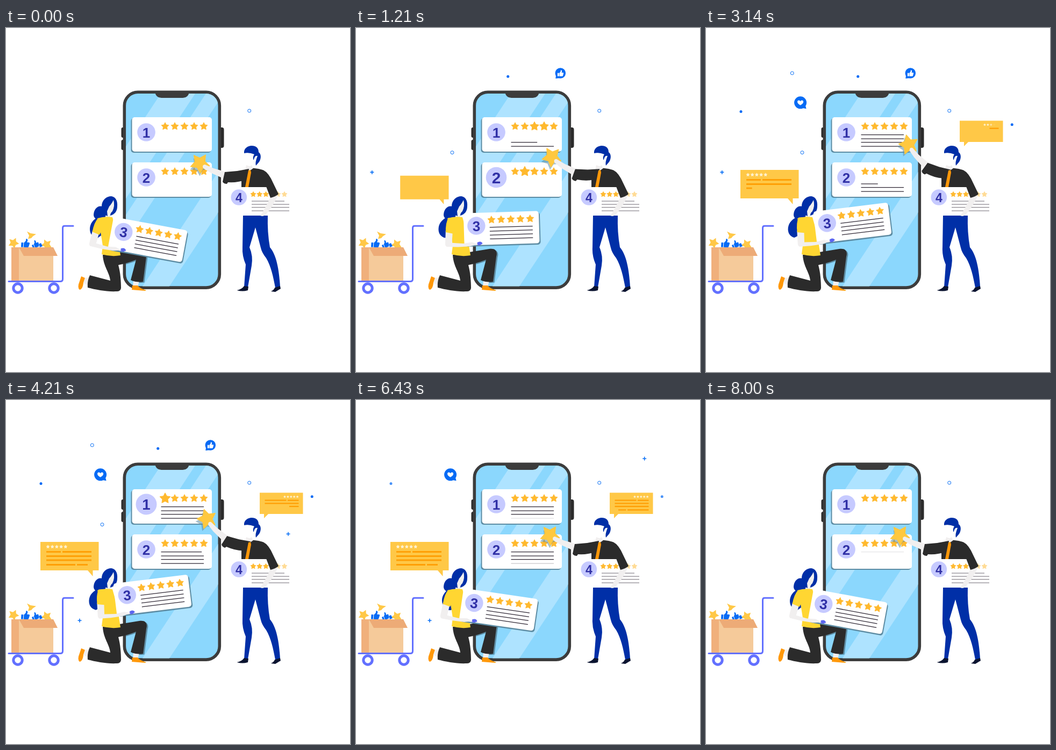
Write an HTML page that moves like this. It is 640 by 640 pixels and loops after 8430 ms.

```html
<!DOCTYPE html>
<html lang="en">
<head>
<meta charset="utf-8">
<title>Customer reviews</title>
<style>
html, body { margin: 0; width: 100%; height: 100%; overflow: hidden; background: #fff; }
svg { display: block; width: 100vw; height: 100vh; }
text { font: bold 26px "Liberation Sans", Arial, sans-serif; fill: #3030a6; text-anchor: middle; }
.dark { fill: #2b2b2b; }
.navy { fill: #002fa7; }
.skin { fill: #f1efef; }
.gold { fill: #ffc847; }
.prize { fill: #ffc83f; stroke: #ffc83f; stroke-width: 1.5; stroke-linejoin: round; }
.star { fill: #ffb92e; stroke: #ffb92e; stroke-width: .8; stroke-linejoin: round; }
.orange { fill: #ff9809; }
.yellow { fill: #ffd632; }
.lilac { fill: #c6caff; }
.blue { fill: #066bf5; }
.shade { fill: #5d8ca3; }
.cream { fill: #fff2cf; }
.white { fill: #fff; }
.rule { stroke: #2d2633; stroke-width: 1.25; }
.bar { stroke: #ff9f05; stroke-width: 2.8; }
.ink { stroke: #0a70f5; fill: none; }
</style>
</head>
<body>
<svg viewBox="0 0 640 640">
  <defs>
    <clipPath id="screen"><rect x="223" y="122" width="171.500" height="358.500" rx="22"/></clipPath>
    <g id="thumb">
      <path d="M-7.500 -.5h3.800v8.500h-3.800z"/>
      <path d="M-2.700 0L.5 -4L1 -8Q4 -8 4 -5L3 -1.500H7Q8.500 -1 8 1L6.500 6.500Q6 8 4.500 8H-2.700z"/>
    </g>
    <path id="legs" d="M180 422L248 411C259 409 264 416 261 425L255 472Q243 474 232 469L242 431Q228 437 209 441C213 455 214 472 214 484Q213 490 206 490C188 491 168 487 152 483Q151 470 156 460L194 470C193 455 181 444 180 422Z"/>
  </defs>

  <g id="phone">
    <rect class="dark" x="214.500" y="185" width="8" height="19" rx="3"/>
    <rect class="dark" x="214.500" y="208" width="8" height="19" rx="3"/>
    <rect class="dark" x="395" y="185" width="10.500" height="38" rx="4"/>
    <rect x="220.300" y="119.300" width="177" height="363.800" rx="25" fill="#8bd7fd" stroke="#3c3c3c" stroke-width="5.600"/>
    <g clip-path="url(#screen)" fill="#aee3ff">
      <path d="M288 122H352L114 482H50Z"/>
      <path d="M372 122H405L167 482H134Z"/>
      <path d="M491 122H541L303 482H253Z"/>
      <use href="#legs" class="shade" x="2.500" y="1.500"/>
    </g>
    <path d="M277 119H341Q339 130 329 130H289Q279 130 277 119Z" fill="#3c3c3c"/>
  </g>
  <g id="reviews"></g>

  <g id="cart">
    <g id="goods"></g>
    <path d="M10 408H24V471H10Z" fill="#f0b07c"/>
    <path d="M24 408H88V471H24Z" fill="#f5ca9a"/>
    <path d="M24 408H88L96 424H33Z" fill="#edab77"/>
    <g fill="none" stroke="#6270ff" stroke-linecap="round">
      <path d="M5 471.500H101Q105.500 471.500 105.500 467V372Q105.500 368.300 109 368.300H125" stroke-width="3"/>
      <g stroke-width="5" fill="#fff"><circle cx="22" cy="484" r="8.200"/><circle cx="89" cy="484" r="8.200"/></g>
    </g>
  </g>

  <g id="woman">
    <path class="navy" id="tail" d="M174 350C162 356 156 364 156 374C156 384 162 390 170 391L180 384V352Z"/>
    <path class="navy" d="M180 332C170 329 163 338 163 348C164 356 172 358 178 356L192 348Z"/>
    <path class="skin" d="M191 330L203 318L206 331Q204 343 199 347L195 346L194 354H184Z"/>
    <path class="navy" d="M178 332C178 320 187 313 196 313C204 314 208 322 207 332C207 341 202 347 194 349Q194 344 198 341Q203 331 200 320Q196 328 192 332L188 341L189 350Q178 346 178 332Z"/>
    <path class="orange" d="M140 462L147 465L144 474Q143 486 137 487Q132 483 137 471Z"/>
    <path class="skin" d="M147 465L154 464L152 479L144 474Z"/>
    <path class="skin" d="M237 470H248L245 482H236Z"/>
    <path class="orange" d="M235 479L245 479Q248 484 261 488L259 489L234 487Z"/>
    <use href="#legs" class="dark"/>
    <path class="yellow" d="M170 354Q184 350 198 352L207 384L213 423Q196 426 178 421L180 405L176 380Z"/>
    <g id="hold">
      <rect class="shade" x="202" y="348" width="140" height="60" rx="5"/>
      <rect class="white" x="200" y="345.500" width="140" height="60" rx="5"/>
      <g id="third"></g>
      <path d="M224 401Q231 397 234 403L229 406H224Z" fill="#5b65f0"/>
      <path class="skin" d="M166 377L179 379L177 400L198 402L214 400L226 404L210 407.500L188 408L167 407Q164 405 164.500 401Z"/>
      <path class="yellow" d="M172 353Q166 362 166 380L180 383L189 354Z"/>
    </g>
  </g>

  <g id="man">
    <path class="navy" d="M441 349H487Q486 380 491 408C503 422 508 448 510 481L501 483C497 462 493 443 484 428Q476 418 474 409L464 371L453 408Q460 424 457 442L450 482H443L446 440Q439 424 440 408Z"/>
    <path d="M443 480L451 481L450 488Q440 491 429.500 488Q439 486 443 480ZM500 483L510 480L511 485L501 491L493 490Q499 487 500 483Z" fill="#0b1430"/>
    <path class="navy" d="M443 233C442 224 450 219 457 219C465 219 470 223 470 231C476 235 474 245 471 249L465 256Q463 250 468 238Q463 236 461 245H460Q459 239 462 235Q452 231 443 233Z"/>
    <path class="dark" d="M438 267L455 260L470 262Q482 264 489 280L488 297H438Z"/>
    <path class="skin" d="M447 255Q454 259 457 255L460 261L453 266L445 264Z"/>
    <rect class="white" x="414" y="296" width="91" height="53"/>
    <g id="fourth"></g>
    <path class="skin" d="M492 314L506 311Q497 332 484 346Q479 352 473 349Q484 333 492 314Z"/>
    <path class="dark" d="M474 263Q484 264 493 280L507 309Q501 314 492 316L484 295Z"/>
    <g id="reach">
      <g id="prize"></g>
      <path class="skin" d="M410 268L386 261L370 254Q364 255 367 261L380 269L409 282Z"/>
      <path class="dark" d="M452 262L430 266L407 268L403 286Q405 290 411 290L413 287Q431 288 444 283L450 278Z"/>
    </g>
    <path class="orange" d="M451 265L455 264L456 269L451 296H445Z"/>
  </g>

  <g id="bubbleL">
    <path class="gold" d="M64 264H172.500V317H161.500V328L152 317H64Z"/>
  </g>
  <g id="bubbleR">
    <path class="gold" d="M472 172.500H552.500V212H488L480 220V212H472Z"/>
  </g>
  <g id="floaters"></g>
</svg>
<script>
const LOOP = 8430;
const $ = id => document.getElementById(id);
const clamp = v => Math.max(0, Math.min(1, v));
const ramp = (t, start, span) => clamp((t - start) / span);
const bump = (t, peak, half) => Math.abs(t - peak) < half ? Math.cos(Math.PI * (t - peak) / half / 2) ** 2 : 0;
const updates = [];

function add(parent, tag, attrs, label) {
  const el = document.createElementNS("http://www.w3.org/2000/svg", tag);
  for (const k in attrs) el.setAttribute(k, attrs[k]);
  if (label) el.textContent = label;
  parent.appendChild(el);
  return el;
}

// Smooth track through [time, value] keys; flat at extremes and ends.
function track(keys) {
  const rise = i => (keys[i + 1][1] - keys[i][1]) / (keys[i + 1][0] - keys[i][0]);
  const slope = keys.map((_, i) => {
    if (!i || i === keys.length - 1) return 0;
    const a = rise(i - 1), b = rise(i);
    return a * b <= 0 ? 0 : 2 * a * b / (a + b);
  });
  return t => {
    let i = 0;
    while (i < keys.length - 2 && t > keys[i + 1][0]) i++;
    const [t0, a] = keys[i], [t1, b] = keys[i + 1];
    const h = t1 - t0, u = clamp((t - t0) / h), w = 1 - u;
    return a * w * w * (1 + 2 * u) + b * u * u * (3 - 2 * u) + h * u * w * (slope[i] * w - slope[i + 1] * u);
  };
}

function star(parent, x, y, r, cls = "star", turn = -90) {
  const pts = [];
  for (let i = 0; i < 10; i++) {
    const a = (turn + i * 36) * Math.PI / 180, q = i % 2 ? r * .52 : r;
    pts.push((q * Math.cos(a)).toFixed(2) + "," + (q * Math.sin(a)).toFixed(2));
  }
  return add(parent, "polygon", { points: pts.join(" "), class: cls, transform: `translate(${x} ${y})` });
}

const rule = (parent, a, b, y, cls = "rule") => add(parent, "line", { x1: a, x2: b, y1: y, y2: y, class: cls });

// A rule that grows from a to b.
function growing(parent, a, b, y, cls, start, span) {
  const el = rule(parent, a, a, y, cls);
  updates.push(t => {
    const p = ramp(t, start, span);
    el.setAttribute("x2", a + (b - a) * p);
    el.style.visibility = p ? "visible" : "hidden";
  });
  return el;
}

function pulse(el, x, y, size, peaks, half) {
  updates.push(t => {
    const s = 1 + size * Math.max(...peaks.map(p => bump(t, p, half)));
    el.setAttribute("transform", `translate(${x} ${y}) scale(${s})`);
  });
}

function badge(parent, x, y, r, label, size) {
  const disc = add(parent, "circle", { r, class: "lilac", transform: `translate(${x} ${y})` });
  const num = add(parent, "text", { y: size * .37, transform: `translate(${x} ${y})`, style: `font-size:${size}px` }, label);
  return [disc, num];
}

function review(top, label, o) {
  const g = add($("reviews"), "g", {});
  add(g, "rect", { x: 232.5, y: top + 2, width: 149, height: 64, rx: 5, class: "shade" });
  add(g, "rect", { x: 234.5, y: top, width: 148.5, height: 64, rx: 5, class: "white" });
  const [disc, num] = badge(g, 261, top + 28, 16.8, label, 26);
  pulse(disc, 261, top + 28, .16, o.disc, 350);
  pulse(num, 261, top + 28, .33, o.disc.map(p => p + 250), 350);
  for (let i = 0; i < 5; i++) {
    const x = 296 + 18 * i;
    pulse(star(g, x, top + 17, 7.3), x, top + 17, .38, o.stars.map(p => p + 333 * i), 333);
    if (i === 4) continue;
    const line = growing(g, 288.5, 368, top + [54, 46.500, 40, 32.500][i], "rule", o.start + o.step * i, o.span);
    updates.push(t => line.style.opacity = 1 - ramp(t, o.out + o.outStep * i, 500));
  }
}
review(166, "1", { disc: [650, 4210], stars: [377, 4210], start: 273, step: 553, span: 629, out: 6000, outStep: 480 });
review(250, "2", { disc: [1150, 4800], stars: [780, 4543], start: 1541, step: 654, span: 744, out: 6060, outStep: 500 });

badge($("third"), 223.3, 369.7, 16.7, "3", 26);
for (let i = 0; i < 5; i++) star($("third"), 251.7 + 18 * i, 359.5, 7.3);
for (let i = 0; i < 4; i++) rule($("third"), 248, 328, 373.3 + 7.2 * i);

badge($("fourth"), 433.3, 315, 14.8, "4", 23);
[460, 471.7, 483.5, 506, 518].forEach((x, i) =>
  star($("fourth"), x, 309.5, 5.2).setAttribute("opacity", i > 2 ? .5 : 1));
[322, 328, 333.7, 340].forEach((y, i) => rule($("fourth"), 457, i ? 527 : 518, y).setAttribute("opacity", .55));

// Star in the hand, with its cast shadow
star($("prize"), 360, 257, 18.5, "shade", -56).setAttribute("opacity", .55);
star($("prize"), 361, 251.5, 18.5, "prize", -56);

// Goods in the cart
star($("goods"), 14, 400, 10.5, "gold", -65);
add($("goods"), "path", { d: "M39 378.500L46 382L56 383.500L50 387.500L47 391L41 392.500L43 386Z", class: "gold" });
star($("goods"), 75.5, 403, 10.5, "gold", -115);
const like1 = add($("goods"), "use", { href: "#thumb", class: "blue" });
const like2 = add($("goods"), "use", { href: "#thumb", class: "blue" });
add($("goods"), "path", { d: "M61 402L65 400L68 406L63 408Z", class: "blue" });
const sliver = add($("goods"), "path", { d: "M60 393L64 391L69 406L64 407Z", fill: "#a9a49c" });
updates.push(t => {
  like1.setAttribute("transform", `translate(36 400) scale(${1 + .5 * bump(t, 2680, 400)}) rotate(4)`);
  like2.setAttribute("transform", `translate(54 402) rotate(-22) scale(${.85 + .15 * bump(t, 5180, 650)})`);
  sliver.style.opacity = bump(t, 5210, 500);
});

// Speech bubbles
function bubble(id, x, y, start, out) {
  const g = $(id);
  updates.push(t => {
    const s = ramp(t, start, 620);
    g.setAttribute("transform", `translate(${x} ${y}) scale(${s}) translate(${-x} ${-y})`);
    g.style.opacity = 1 - ramp(t, out, 350);
  });
  return g;
}
const left = bubble("bubbleL", 172.5, 328, 695, 7250);
const right = bubble("bubbleR", 472, 220, 1698, 7640);

function rating(g, x, y, gap, r, start) {
  for (let i = 0; i < 5; i++) {
    const el = star(g, x + gap * i, y, r, "cream");
    updates.push(t => el.style.opacity = ramp(t, start + 170 * i, 300));
  }
}
rating(left, 78, 273, 8.2, 3.8, 1720);
rating(right, 518.5, 180, 5.9, 2.6, 2600);
[
  [75, 102, 282.5, 1780, 460], [105, 159, 282.5, 2090, 520], [75, 159, 290.5, 2600, 500],
  [75, 159, 298, 3080, 480], [75, 129, 306.5, 3500, 360], [132, 152, 306.5, 3860, 160]
].forEach(([a, b, y, s, d]) => growing(left, a, b, y, "bar", s, d));
[
  [544.5, 524, 186.7, 3000, 170], [521.5, 481.5, 186.7, 3170, 320], [544.5, 481.5, 192.3, 3520, 500],
  [544.5, 481.5, 198, 4075, 490], [544.5, 505, 204.5, 4590, 320], [502.5, 488, 204.5, 4910, 150]
].forEach(([a, b, y, s, d]) => growing(right, a, b, y, "bar", s, d).style.strokeWidth = 2.3);

// Small marks around the scene
const marks = {
  ring: g => add(g, "circle", { r: 3, class: "ink" }),
  dot: g => add(g, "circle", { r: 2.5, class: "blue" }),
  plus: g => add(g, "path", { d: "M-3.500 0H3.500M0 -3.500V3.500", class: "ink", "stroke-width": 1.6 }),
  like: g => {
    add(g, "path", { d: "M-8 2L-9 10L0 9Z", class: "blue" });
    add(g, "circle", { r: 9.8, class: "blue" });
    add(g, "use", { href: "#thumb", class: "white", transform: "scale(.72)" });
  },
  heart: g => {
    add(g, "path", { d: "M3 10L11 11.500L9 4Z", class: "blue" });
    add(g, "circle", { r: 11.5, class: "blue" });
    add(g, "path", { d: "M0 5C-3 3-6 1-5.500-2C-5-5-1-5 0-2C1-5 5-5 5.500-2C6 1 3 3 0 5Z", class: "white" });
  }
};
[
  ["ring", 452.7, 154, -900, 9000], ["ring", 179, 231.7, 650, 5850], ["ring", 160.3, 84, 1500, 4600],
  ["plus", 29.8, 268.4, 450, 3650], ["plus", 525, 249.3, 3400, 5900], ["plus", 137, 410.3, 3600, 7600],
  ["plus", 536.7, 109, 4550, 7000], ["dot", 282.7, 90.3, 500, 6040], ["dot", 569.3, 179.8, 1350, 6330],
  ["dot", 65, 155.5, 2700, 6330], ["like", 380.3, 84, 550, 5500], ["heart", 175.6, 138.8, 2350, 7600]
].forEach(([kind, x, y, start, out]) => {
  const g = add($("floaters"), "g", {});
  marks[kind](g);
  const big = kind === "like" || kind === "heart";
  updates.push(t => {
    const p = ramp(t, start, 400) * (1 - ramp(t, out, 380));
    g.setAttribute("transform", `translate(${x} ${y}) scale(${big ? p : 1})`);
    g.style.opacity = big ? 1 : p;
  });
});

// Limbs and hair
const cardTurn = track([[0, 10.5], [1210, -1.7], [2210, -7], [4290, -7], [5210, -3], [6430, 8.3], [6900, 10.5], [LOOP, 10.5]]);
const armTurn = track([[0, 0], [1210, 7.5], [2210, 23], [2600, 24], [3700, 24], [4210, 20.7], [5210, 7.5], [6430, 0], [LOOP, 0]]);
const hairTurn = track([[0, 0], [1210, 5.5], [2210, 9], [4210, 3.5], [5210, -3.5], [6430, -9], [8000, 0], [LOOP, 0]]);
updates.push(t => {
  $("hold").setAttribute("transform", `rotate(${cardTurn(t)} 168 350)`);
  $("reach").setAttribute("transform", `rotate(${armTurn(t)} 450 272)`);
  $("tail").setAttribute("transform", `rotate(${hairTurn(t)} 174 348)`);
});

const begin = performance.now();
function frame() {
  const t = (performance.now() - begin) % LOOP;
  updates.forEach(f => f(t));
  requestAnimationFrame(frame);
}
frame();
</script>
</body>
</html>
```
